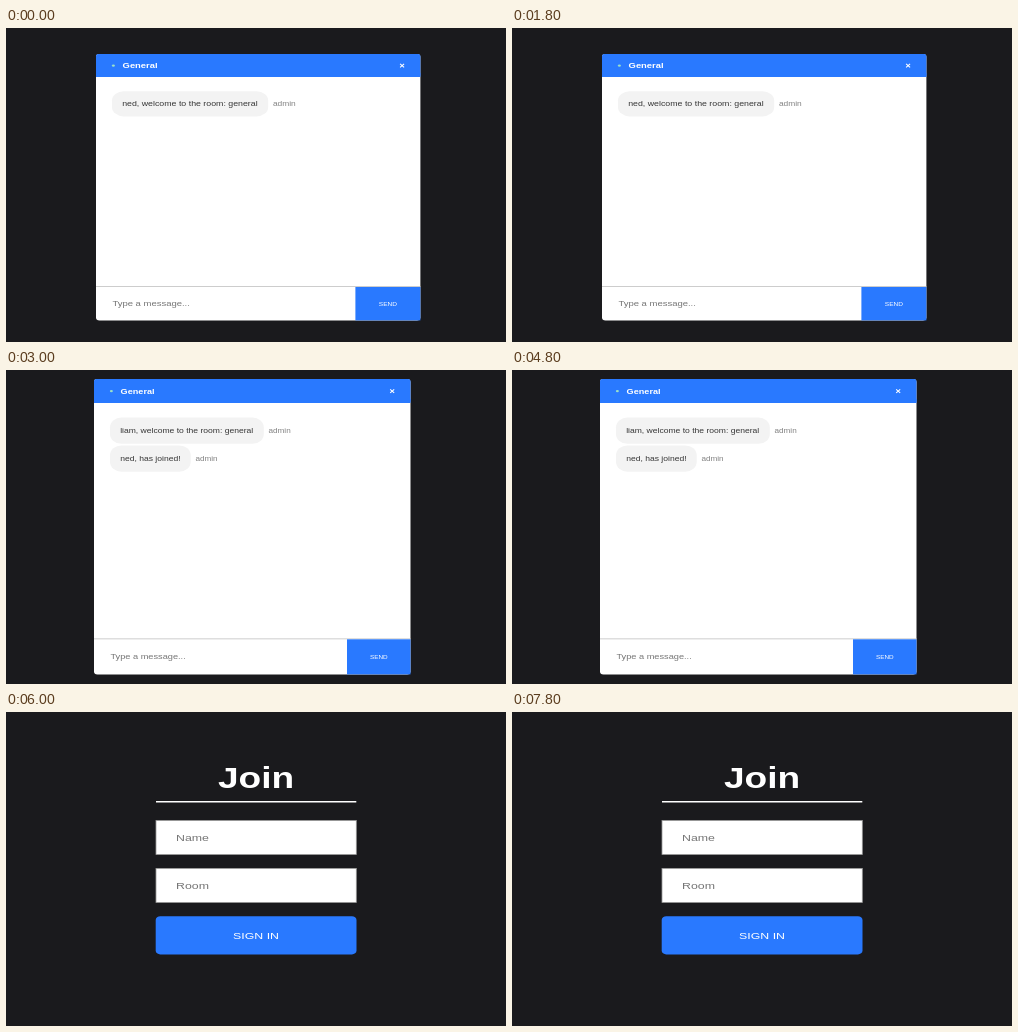
Animation of 500x314 px, one loop 9 s. Source, as an HTML page:

```html
<!DOCTYPE html>
<html lang="en">
<head>
<meta charset="utf-8">
<title>Chat rooms</title>
<style>
  html, body { margin: 0; width: 100%; height: 100%; overflow: hidden; background: #1a1a1d; }
  svg { display: block; width: 500px; height: 314px; }
  text { font-family: "Liberation Sans", Arial, sans-serif; white-space: pre; }
</style>
</head>
<body>
<svg id="stage" viewBox="0 0 500 314"></svg>
<script>
const NS = "http://www.w3.org/2000/svg";
const BLUE = "#2979ff", WHITE = "#fff", HINT = "#757575";
const HOLD = 3000;
const stage = document.getElementById("stage");

function add(parent, tag, attrs) {
  const el = document.createElementNS(NS, tag);
  for (const key in attrs) el.setAttribute(key, attrs[key]);
  return parent.appendChild(el);
}

// Each scene is a page shown at its own zoom, sx by sy.
function makeScene(sx, sy) {
  const root = add(stage, "g", { visibility: "hidden" });
  return {
    root,
    box(x, y, right, bottom, fill, radius = 0, more = {}) {
      add(root, "rect", {
        x, y, width: right - x, height: bottom - y, fill,
        rx: radius * sx, ry: radius * sy, ...more
      });
    },
    text(x, y, size, fill, label, more = {}) {
      add(root, "text", {
        transform: `translate(${x} ${y}) scale(${sx} ${sy})`,
        "font-size": size, fill, ...more
      }).textContent = label;
    },
    path(d, stroke, width) {
      add(root, "path", { d, stroke, "stroke-width": width, fill: "none" });
    }
  };
}

function chatRoom({ sx, sy, left, top, right, bottom, head, foot, send, messages }) {
  const s = makeScene(sx, sy);
  const mid = (top + head) / 2;
  const footMid = (foot + bottom) / 2;
  const closeX = right - 18.3;

  s.box(left, top, right, bottom, WHITE, 6);
  s.box(left, top, right, head, BLUE, 4);
  s.box(left, head - 4, right, head, BLUE);
  add(s.root, "ellipse", { cx: left + 17.4, cy: mid + 0.1, rx: 1.5, ry: 1.2, fill: "#9be0c8" });
  s.text(left + 26.6, mid + 2.5, 16, WHITE, "General", { "font-weight": "bold" });
  s.path(`M${closeX - 2} ${mid - 1.6}l4 3.4m0 -3.4l-4 3.4`, WHITE, 1.1);

  for (const [y, end, body] of messages) {
    s.box(left + 16, y, end, y + 53 * sy, "#f3f3f3", 20);
    s.text(left + 26.2, y + 53 * sy / 2 + 2.6, 15, "#353535", body);
    s.text(end + 4.7, y + 53 * sy / 2 + 2.6, 14.3, "#828282", "admin");
  }

  s.box(left, foot - 0.9, right, foot, "#c8c8c8");
  s.text(left + 16.4, footMid + 2.5, 16.2, HINT, "Type a message...");
  s.box(send, foot, right, bottom, BLUE);
  s.text((send + right) / 2, footMid + 2, 11.2, WHITE, "SEND", { "text-anchor": "middle" });
  return s.root;
}

function joinForm() {
  const s = makeScene(0.927, 0.735);
  const middle = { "text-anchor": "middle" };
  s.text(250, 76.3, 40, WHITE, "Join", { ...middle, "font-weight": "bold" });
  s.box(150, 89, 350.3, 90.5, WHITE);
  [["Name", 108.5], ["Room", 156.4]].forEach(([label, y]) => {
    s.box(150, y, 350.3, y + 34, WHITE, 0, { stroke: "#9a9a9a", "stroke-width": 0.8 });
    s.text(170, y + 20.3, 13.333, HINT, label);
  });
  s.box(149.7, 204.2, 350.5, 242.4, BLUE, 5);
  s.text(250, 226.6, 13.333, WHITE, "SIGN IN", middle);
  return s.root;
}

const scenes = [
  chatRoom({
    sx: 0.587, sy: 0.475, left: 90, top: 26, right: 414.4, bottom: 292.4,
    head: 49, foot: 259, send: 349.4,
    messages: [[63.2, 262.2, "ned, welcome to the room: general"]]
  }),
  chatRoom({
    sx: 0.571, sy: 0.495, left: 88, top: 9, right: 404.5, bottom: 304.4,
    head: 33, foot: 269.3, send: 341,
    messages: [
      [47.6, 257.8, "liam, welcome to the room: general"],
      [75.4, 184.7, "ned, has joined!"]
    ]
  }),
  joinForm()
];

function draw() {
  const current = Math.floor(performance.now() / HOLD) % scenes.length;
  scenes.forEach((scene, i) =>
    scene.setAttribute("visibility", i === current ? "visible" : "hidden"));
  requestAnimationFrame(draw);
}
draw();
</script>
</body>
</html>
```
